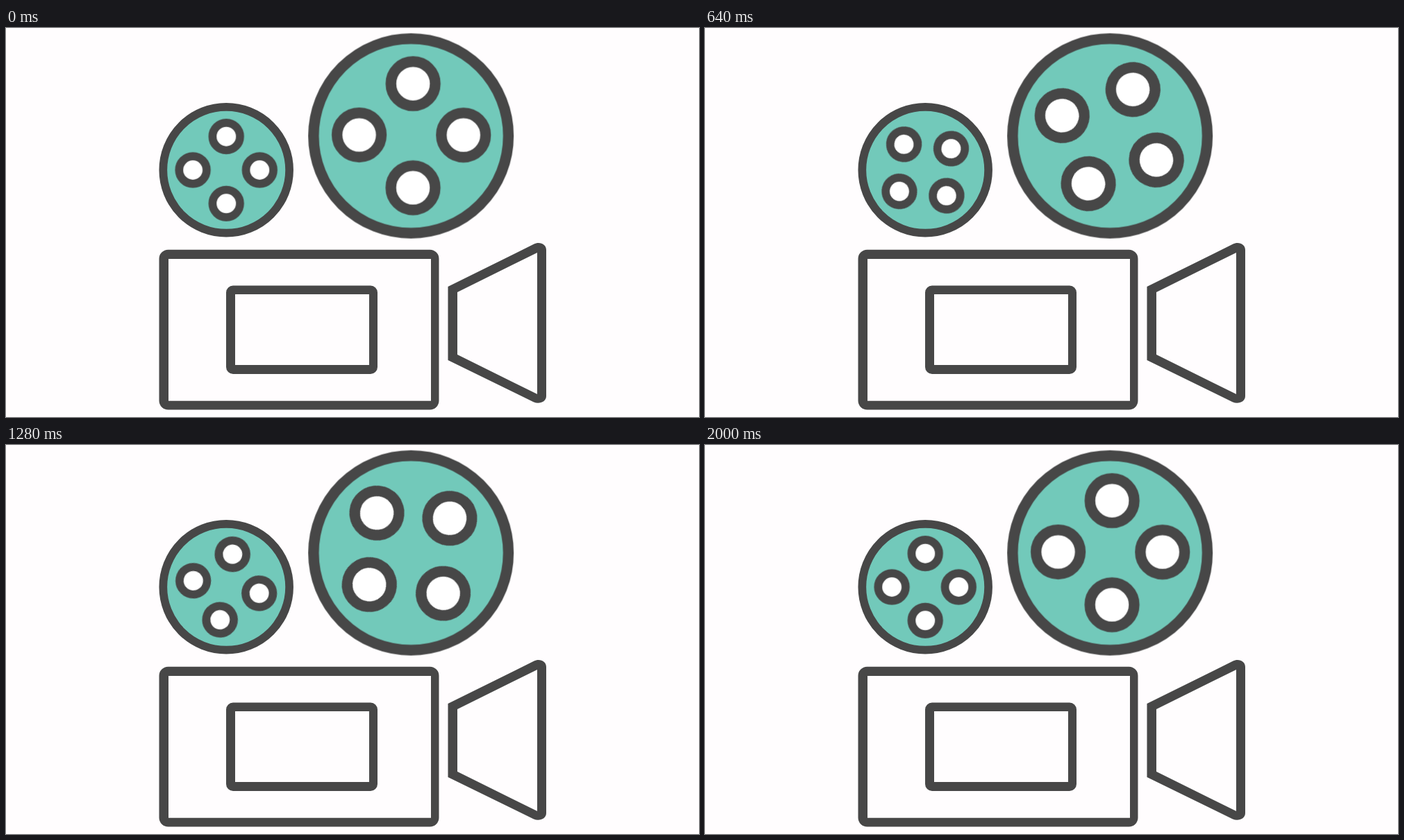
These frames come from a looping animation (998x561 px, 2040 ms). An HTML page:

```html
<!DOCTYPE html>
<html lang="en">
<head>
<meta charset="utf-8">
<title>Film camera</title>
<style>
  html, body {
    margin: 0;
    width: 100%;
    height: 100%;
    overflow: hidden;
    background: #fffdfe;
  }
  svg { display: block; width: 998px; height: 561px; }
  .body { fill: #474747; fill-rule: evenodd; }
  .reel { stroke: #474747; }
  .disc { fill: #72c9ba; }
  .hole { fill: #fff; }

  /* 51 held poses of 40 ms; the last one completes the whole turns */
  .spin { animation: spin 2040ms steps(51, end) infinite; }
  .slow { --turn: 367.2deg; }
  .fast { --turn: 734.4deg; }
  @keyframes spin {
    from { transform: rotate(0deg); }
    to { transform: rotate(var(--turn)); }
  }
</style>
</head>
<body>
<svg viewBox="0 0 998 561">
  <g class="reel" transform="translate(317.2 204.8)" stroke-width="11.7">
    <circle class="disc" r="90.9"/>
    <g class="spin fast">
      <circle class="hole" cy="-48.3" r="19.8"/>
      <circle class="hole" cx="48.1" r="19.8"/>
      <circle class="hole" cy="48.3" r="19.8"/>
      <circle class="hole" cx="-48.1" r="19.8"/>
    </g>
  </g>

  <!-- the large reel's holes sit slightly off centre -->
  <g class="reel" transform="translate(583.2 155.6)" stroke-width="15.4">
    <circle class="disc" r="140.3"/>
    <g class="spin slow">
      <circle class="hole" cx="3" cy="-75.3" r="31.9"/>
      <circle class="hole" cx="75.6" cy="-1.2" r="31.9"/>
      <circle class="hole" cx="2.9" cy="74.8" r="31.9"/>
      <circle class="hole" cx="-74.6" cy="-1.4" r="31.9"/>
    </g>
  </g>

  <g class="body">
    <path d="M233.5 319.8H610.5a13 13 0 0 1 13 13V537.5a13 13 0 0 1-13 13H233.5a13 13 0 0 1-13-13V332.8a13 13 0 0 1 13-13z
             M234 333V537.8H612V333z"/>
    <path d="M327 371.5H525a10 10 0 0 1 10 10V489a10 10 0 0 1-10 10H327a10 10 0 0 1-10-10V381.500a10 10 0 0 1 10-10z
             M330 384V486H523V384z"/>
    <path d="M636.5 373L760 311.800C768 307.500 778 311.500 778 320V531C778 539 768 543 760 539.500L636.500 479z
             M650 381V471L765 528V324z"/>
  </g>
</svg>
</body>
</html>
```
